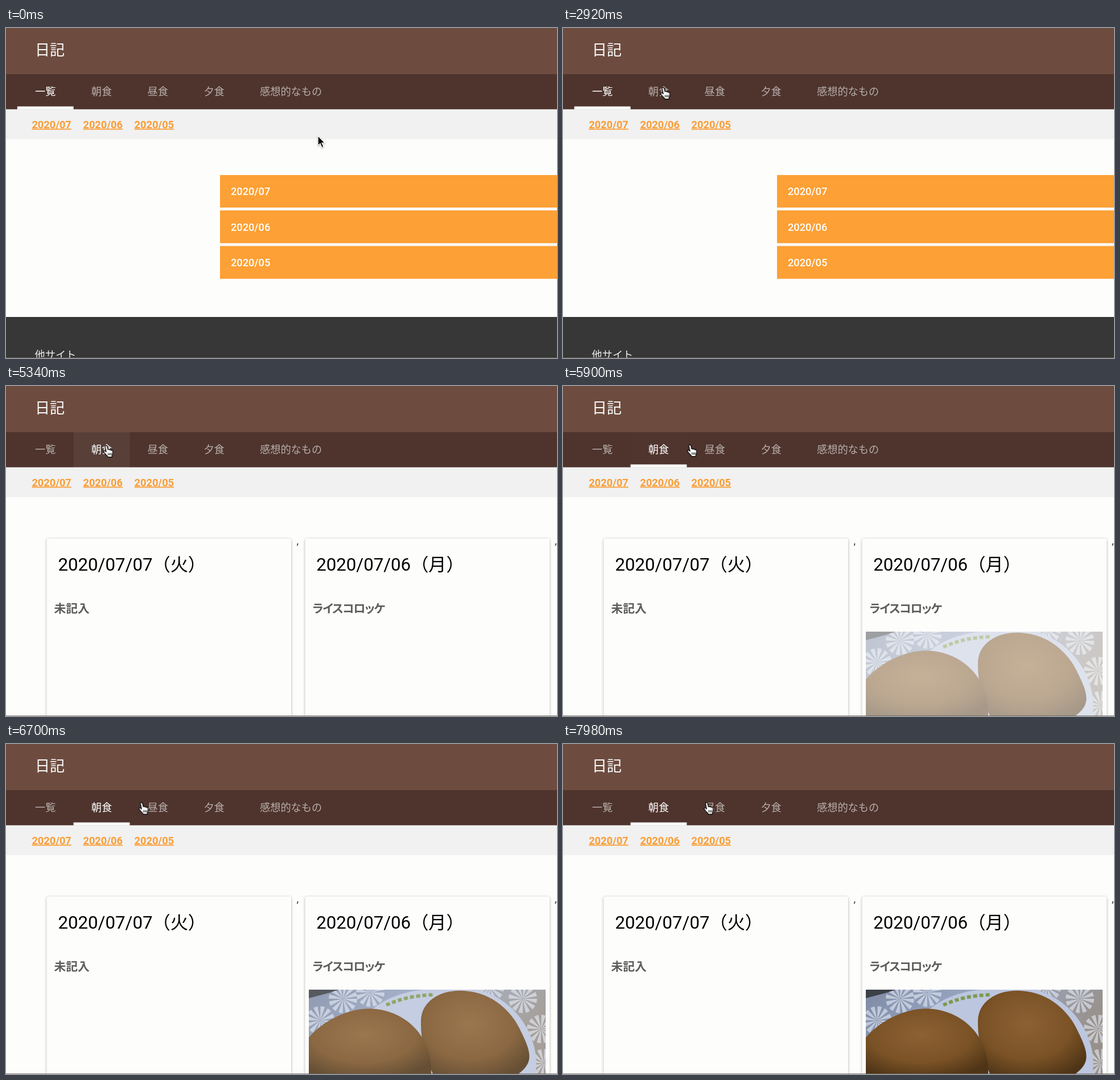
These frames come from a looping animation (968 by 579 pixels, 8000 ms). An HTML page:

```html
<!DOCTYPE html>
<html lang="ja">
<head>
<meta charset="utf-8">
<title>日記</title>
<style>
html, body { margin: 0; width: 968px; height: 579px; overflow: hidden; background: #fdfdfc; }
svg { display: block; }
text { font-family: Roboto, "Noto Sans CJK JP", "Noto Sans CJK", sans-serif; font-size: 18.2px; }

.site { font-size: 26px; fill: #fff; }
.tab { fill: #fff; fill-opacity: .6; }
.on { font-weight: 500; fill-opacity: 1; }
.link { font-weight: 700; fill: #fa9d35; text-decoration: underline; }
.item rect { fill: #fda035; }
.item text { font-weight: 500; fill: #fff; }
.card { fill: #fdfdfc; filter: drop-shadow(0 1px 2px rgba(0,0,0,.32)); }
.date { font-size: 31.2px; fill: #000; }
.meal { font-size: 20.8px; font-weight: 700; fill: #5c5c5c; font-feature-settings: "palt"; }
.kana { letter-spacing: -.06em; }

.anim { animation: 8s linear infinite; }
.list { animation-name: leave; }
.meals { animation-name: enter; }
.focus { animation-name: focus; }
.ripple { animation-name: ripple; }
.bar { animation-name: bar; transform-box: fill-box; transform-origin: 0 0; }
.photo { animation-name: photo; }
.cursor { animation-name: move; }
.arrow { animation-name: arrow; }
.hand { animation-name: hand; }

@keyframes leave { 0%, 60.74% { opacity: 1 } 60.75%, 100% { opacity: 0 } }
@keyframes enter { 0%, 60.74% { opacity: 0 } 60.75%, 100% { opacity: 1 } }
@keyframes arrow { 0%, 17.3% { opacity: 1 } 17.31%, 100% { opacity: 0 } }
@keyframes hand { 0%, 17.3% { opacity: 0 } 17.31%, 100% { opacity: 1 } }
@keyframes focus {
  0%, 54% { opacity: 0 }
  58%, 68.5% { opacity: .06 }
  74%, 100% { opacity: 0 }
}
@keyframes ripple {
  0%, 53.94% { opacity: 0; transform: translate(176px, 104px) scale(31) }
  53.95% { opacity: .27; transform: translate(176px, 104px) scale(31); animation-timing-function: ease-out }
  58% { opacity: .25; transform: translate(168px, 112px) scale(58.5) }
  60.75%, 100% { opacity: 0; transform: translate(168px, 112px) scale(58.5) }
}
@keyframes bar {
  0%, 67.5% { transform: scaleX(0); animation-timing-function: cubic-bezier(.25, .8, .5, 1) }
  72.5%, 100% { transform: translateX(98.8px) }
}
@keyframes photo {
  0%, 70.5% { opacity: 0 }
  73.75% { opacity: .5 }
  83.75% { opacity: .87 }
  94%, 100% { opacity: 1 }
}
@keyframes move {
  0%, 7% { transform: translate(548px, 189px); animation-timing-function: cubic-bezier(.5, 0, .8, .55) }
  17.25% { transform: translate(393px, 144px); animation-timing-function: cubic-bezier(.3, .4, .7, .8) }
  21.25% { transform: translate(254.5px, 102px); animation-timing-function: ease-out }
  26.5% { transform: translate(184px, 97px); animation-timing-function: ease-out }
  31.25%, 67.5% { transform: translate(175.5px, 104px); animation-timing-function: ease-in-out }
  73.75% { transform: translate(222.5px, 103px) }
  83.75% { transform: translate(237.5px, 102.5px) }
  100% { transform: translate(252px, 102.5px) }
}
</style>
</head>
<body>
<svg width="968" height="579" viewBox="0 0 968 579">
  <defs>
    <clipPath id="tabClip"><rect x="118.6" y="81" width="98.8" height="61.6"/></clipPath>
    <clipPath id="photoClip"><rect x="532" y="431" width="416" height="148"/></clipPath>
    <radialGradient id="crust" cx=".45" cy=".4" r=".7">
      <stop offset="0" stop-color="#8c6234"/>
      <stop offset=".6" stop-color="#7a5226"/>
      <stop offset="1" stop-color="#4e3416"/>
    </radialGradient>
    <linearGradient id="cloth" x2="1" y2=".3">
      <stop offset="0" stop-color="#7f8ba5"/>
      <stop offset=".5" stop-color="#9dabc8"/>
      <stop offset="1" stop-color="#98908a"/>
    </linearGradient>
    <circle id="lace" r="13" fill="none" stroke="#dfe6f2" stroke-width="24" stroke-dasharray="4 2.8" opacity=".65"/>
  </defs>

  <rect width="968" height="579" fill="#fdfdfc"/>
  <rect width="968" height="81" fill="#6d4c3f"/>
  <rect y="81" width="968" height="62" fill="#4e342d"/>
  <rect y="142.6" width="968" height="52.4" fill="#f1f1f1"/>
  <text class="site" x="51" y="47.8">日記</text>

  <g clip-path="url(#tabClip)">
    <rect class="anim focus" x="118" y="81" width="100" height="62" fill="#fff"/>
  </g>
  <text class="tab" x="248.6" y="118">昼食</text>
  <text class="tab" x="347.4" y="118">夕食</text>
  <text class="tab" x="446" y="118">感想的なもの</text>
  <text class="link" x="45.4" y="175.6">2020/07</text>
  <text class="link" x="135.5" y="175.6">2020/06</text>
  <text class="link" x="225.6" y="175.6">2020/05</text>

  <g class="anim list">
    <text class="tab on" x="51" y="118">一覧</text>
    <text class="tab" x="149.8" y="118">朝食</text>
    <rect x="19.8" y="137.6" width="98.8" height="5.2" fill="#fff"/>
    <g class="item"><rect x="376" y="258" width="592" height="57"/><text x="395" y="293">2020/07</text></g>
    <g class="item"><rect x="376" y="320" width="592" height="57.5"/><text x="395" y="355.5">2020/06</text></g>
    <g class="item"><rect x="376" y="382.5" width="592" height="57.5"/><text x="395" y="418">2020/05</text></g>
    <rect y="507" width="968" height="72" fill="#373737"/>
    <text x="50.5" y="579.5" fill="#eee">他サイト</text>
  </g>

  <g class="anim meals">
    <text class="tab" x="51" y="118">一覧</text>
    <text class="tab on" x="149.8" y="118">朝食</text>
    <rect class="anim bar" x="19.8" y="137.6" width="98.8" height="5.2" fill="#fff"/>

    <rect class="card" x="71.5" y="267.5" width="429.5" height="340" rx="4"/>
    <text class="date" x="91.5" y="324.3">2020/07/07（火）</text>
    <text class="meal" x="84.5" y="398.3">未記入</text>
    <text x="510.5" y="278" fill="#333">,</text>

    <rect class="card" x="525.5" y="267.5" width="429.5" height="340" rx="4"/>
    <text class="date" x="545.2" y="324.3">2020/07/06（月）</text>
    <text class="meal kana" x="538.5" y="398.3">ライスコロッケ</text>
    <text x="964" y="278" fill="#333">,</text>

    <g clip-path="url(#photoClip)">
      <g class="anim photo">
        <rect x="532" y="431" width="416" height="148" fill="url(#cloth)"/>
        <use href="#lace" x="552" y="485"/>
        <use href="#lace" x="592" y="447"/>
        <use href="#lace" x="640" y="436"/>
        <use href="#lace" x="850" y="427"/>
        <use href="#lace" x="908" y="447"/>
        <use href="#lace" x="940" y="500"/>
        <use href="#lace" x="945" y="560"/>
        <path d="M532 431h52l-14 5-38 10z" fill="#3c4147"/>
        <path d="M600 579C596 500 640 440 735 431H830C900 450 940 520 930 579Z" fill="#bcc6de"/>
        <path d="M668 458Q705 441 752 440" fill="none" stroke="#7d9a50" stroke-width="6" stroke-dasharray="7 4"/>
        <path d="M729 485C730 450 765 430 805 433C855 436 890 470 905 505C925 545 925 560 900 579H750C735 545 728 515 729 485Z" fill="url(#crust)"/>
        <path d="M532 515C560 482 610 460 650 465C710 472 750 520 747 579H532Z" fill="url(#crust)"/>
      </g>
    </g>
  </g>

  <g clip-path="url(#tabClip)"><circle class="anim ripple" r="1" fill="#fff"/></g>
  <rect y="578" width="968" height="1" fill="#6b6158" opacity=".75"/>

  <g class="anim cursor">
    <path class="anim arrow" d="M0 0V17.5L4 13.8L7 20.8L10 19.5L7 12.7H12.3Z" fill="#000" stroke="#fff" stroke-width="1.3" style="filter:drop-shadow(0 1px 1px rgba(0,0,0,.35))"/>
    <g class="anim hand" stroke="#000" stroke-width="1.3" stroke-linejoin="round">
      <path transform="translate(-5 -.5)" fill="#fff" d="M5 .8C6.3.3 7 1.5 7.4 3L8.6 8.2C9.3 7.2 11 7.4 11.5 8.6C12.4 7.8 13.9 8.2 14.3 9.5C15.4 8.9 16.8 9.4 17 10.8C17.5 13.5 17 15.5 16 18L15.8 21.2H8L7.6 19.5C5.8 17.8 3 15 1.2 12.2C.3 10.6 2.2 9.4 3.8 10.6L5.5 12L3.6 3C3.3 1.8 4 .9 5 .8Z"/>
      <path d="M4 13.5l.3 4M6.7 13.5v4M9.2 13.5l-.2 4" fill="none" stroke-width="1.1"/>
    </g>
  </g>
</svg>
</body>
</html>
```
